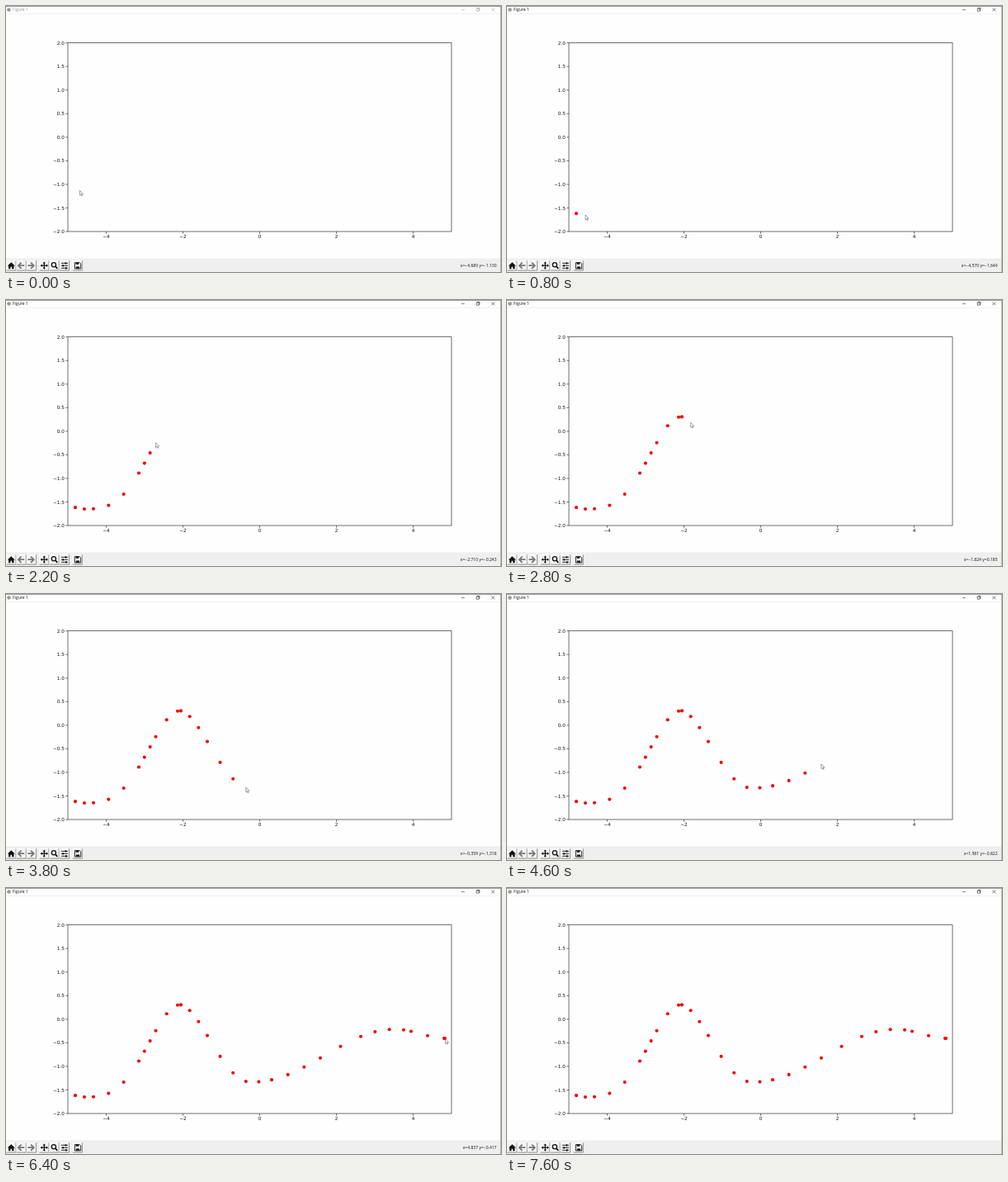
These frames come from a looping animation (600x322 px, 8 s). An HTML page:

```html
<!DOCTYPE html>
<html lang="en">
<head>
<meta charset="utf-8">
<title>Scatter by clicking</title>
<style>
  html, body { margin: 0; width: 100%; height: 100%; overflow: hidden; background: #fefefe; }
  svg { display: block; width: 600px; height: 322px; }
  .ui { font: 5.05px "Open Sans", "Noto Sans", sans-serif; }
  .tick { font: 5.7px "DejaVu Sans", sans-serif; fill: #111; }
  .line { fill: none; stroke: #222; stroke-width: .65; }
  #chrome { color: #999; }
  #chrome.active { color: #111; }
</style>
</head>
<body>
<svg viewBox="0 0 600 322">
  <rect width="600" height="322" fill="#fefefe"/>
  <path d="M0 .4H600" stroke="#777" stroke-width=".8"/>
  <path d="M0 9.5H600" stroke="#f1f1f1"/>
  <path d="M599.6 0V322" stroke="#999" stroke-width=".8"/>

  <g id="chrome">
    <circle cx="3.5" cy="4.5" r="2.3" fill="#999"/>
    <text class="ui" x="8" y="6.4" fill="currentColor">Figure 1</text>
    <path d="M552 4.6h3.8M570.2 3.2h3v3h-3zM571 3.2v-.8h3v3h-.8M588.4 2.6l3.8 3.8m0-3.8l-3.8 3.8"
          fill="none" stroke="currentColor" stroke-width=".55"/>
  </g>

  <g id="axes"><rect class="line" x="75" y="44.7" width="465" height="228.3"/></g>
  <g id="dots" fill="#f00707"></g>

  <rect y="305.5" width="599" height="16.5" fill="#efefef"/>
  <g id="buttons"></g>
  <g fill="#111" stroke="#111">
    <path d="M1.8 314.6L6.3 310.2L10.8 314.6H9.5V318.2H7.2V315.7H5.4V318.2H3.1V314.6Z" stroke="none"/>
    <path d="M46.3 310.4V318M42.5 314.2H50.1" stroke-width="1.2"/>
    <path d="M44.5 311.6L46.3 309.6L48.1 311.6ZM44.5 316.8L46.3 318.8L48.1 316.8ZM43.7 312.4L41.7 314.2L43.7 316ZM48.9 312.4L50.9 314.2L48.9 316Z" stroke="none"/>
    <circle cx="57.9" cy="313.2" r="2.6" fill="none" stroke-width="1.3"/>
    <path d="M60 315.4L62.3 317.9" stroke-width="1.6"/>
    <path d="M67 311.3h8M67 314.3h8M67 317.3h8" stroke-width=".9"/>
    <path d="M72.4 310.2v2.2M69.2 313.2v2.2M72.8 316.2v2.2" stroke-width="1.6"/>
    <path d="M83.3 310.6H89.2L90.7 312.1V318H83.3Z" fill="none" stroke-width=".9"/>
    <path d="M84.6 310.6h3.6v2.2h-3.6zM84.8 315.4h4.3v2.4h-4.3z" stroke="none"/>
  </g>
  <g fill="none" stroke="#777" stroke-width="1.8">
    <path d="M18.5 310.6L14.9 314.2L18.5 317.8M15.2 314.2H22.2"/>
    <path d="M30.1 310.6L33.7 314.2L30.1 317.8M33.4 314.2H26.4"/>
  </g>
  <text id="readout" class="ui" x="594.6" y="316.4" text-anchor="end" fill="#111"></text>
  <path id="cursor" d="M0 0V5.8L1.3 4.6L2.2 6.6L3.1 6.2L2.3 4.2H4Z" fill="#fff" stroke="#444" stroke-width=".5"/>
</svg>
<script>
  const STEP = 200, LOOP = 8000;
  const FIRST_CLICK = 4, LAST_CLICK = 32, GONE = 37;
  const $ = id => document.getElementById(id);
  const add = (parent, tag, attrs, text = '') => {
    const node = document.createElementNS('http://www.w3.org/2000/svg', tag);
    for (const name in attrs) node.setAttribute(name, attrs[name]);
    node.textContent = text;
    return $(parent).appendChild(node);
  };

  // Data units to stage pixels and back
  const X0 = 307.5, Y0 = 158.85, SX = 46.5, SY = 57.08;
  const toPixel = (x, y) => [X0 + x * SX, Y0 - y * SY];
  const toData = ([px, py]) => [(px - X0) / SX, (Y0 - py) / SY];
  const signed = (v, digits) => v.toFixed(digits).replace('-', '−');
  const mix = (a, b, t) => a + (b - a) * t;
  const between = (a, b, t) => a.map((v, i) => mix(v, b[i], t));

  for (let x = -4; x <= 4; x += 2) {
    const px = toPixel(x, 0)[0];
    add('axes', 'path', { class: 'line', d: `M${px} 273v2.6` });
    add('axes', 'text', { class: 'tick', x: px, y: 281, 'text-anchor': 'middle' }, signed(x, 0));
  }
  for (let y = -2; y <= 2; y += 0.5) {
    const py = toPixel(0, y)[1];
    add('axes', 'path', { class: 'line', d: `M75 ${py}h-2.6` });
    add('axes', 'text', { class: 'tick', x: 70.8, y: py + 2.1, 'text-anchor': 'end' }, signed(y, 1));
  }

  for (let i = 0; i < 7; i++) {
    const x = 0.6 + 12.3 * i + (i > 2 ? 3 : 0) + (i > 5 ? 3.5 : 0);
    add('buttons', 'rect', { x, y: 308.3, width: 11.4, height: 11.8, fill: '#f3f3f3' });
    add('buttons', 'path', { d: `M${x} 320.1V308.3h11.4`, fill: 'none', stroke: '#fff', 'stroke-width': .7 });
    add('buttons', 'path', { d: `M${x} 320.1h11.4V308.3`, fill: 'none', stroke: '#777', 'stroke-width': .8 });
  }

  // Eases from key to key; each key is [position, value, skew of the span leading to it]
  const follow = (keys, at, ease) => {
    const i = Math.max(1, keys.findIndex(key => key[0] >= at));
    const [p, a] = keys[i - 1], [q, b, skew = 1] = keys[i];
    return mix(a, b, ease(((at - p) / (q - p)) ** skew));
  };
  const linear = t => t;
  const wave = t => (1 - Math.cos(Math.PI * t)) / 2;

  // Hand's pace along x by click number, and the turning points of the curve it traces
  const pace = [[0, 84], [2, 106], [5, 161], [8, 181.5], [10, 208], [11, 212], [14, 244],
    [19, 322], [22, 381], [24, 430], [27, 482], [28, 491], [30, 531], [31, 532]];
  const turns = [[72, 249], [95, 253], [211, 141.3, 1.5], [297, 235, .87], [471, 171, 1.03], [534, 182]];

  const points = Array.from({ length: 32 }, (_, n) => {
    const x = follow(pace, n, linear);
    return [x, follow(turns, x, wave)];
  });
  const dots = points.map(([cx, cy]) => add('dots', 'circle', { cx, cy, r: 2.05 }));

  // One click per step, with three quick double clicks
  const dotCount = k => k < FIRST_CLICK ? 0
    : Math.min(points.length, k - 3 + (k >= 12) + (k >= 23) + (k >= LAST_CLICK));

  // The pointer comes in, hurries to each next click, then leaves by the lower right corner
  const entry = toPixel(-4.689, -1.13), rest = toPixel(4.837, -0.417), corner = [587, 313];
  const pointerAt = k => {
    if (k >= GONE) return null;
    if (k >= LAST_CLICK) return between(rest, corner, ((k - LAST_CLICK) / 4) ** 2);
    return k < FIRST_CLICK ? between(entry, points[0], k / 3) : points[dotCount(k)];
  };

  function draw(time) {
    const k = Math.floor(time % LOOP / STEP);
    const count = dotCount(k);
    dots.forEach((dot, i) => dot.setAttribute('visibility', i < count ? 'visible' : 'hidden'));
    $('chrome').classList.toggle('active', count > 0);

    const tip = pointerAt(k);
    $('cursor').setAttribute('visibility', tip ? 'visible' : 'hidden');
    if (tip) $('cursor').setAttribute('transform', `translate(${tip})`);

    const inside = tip && tip[0] < 540;
    const [x, y] = inside ? toData(tip).map(v => signed(v, 3)) : [];
    $('readout').textContent = inside ? `x=${x} y=${y}` : '';
  }

  const start = performance.now();
  const tick = () => {
    draw(performance.now() - start);
    requestAnimationFrame(tick);
  };
  tick();
</script>
</body>
</html>
```
